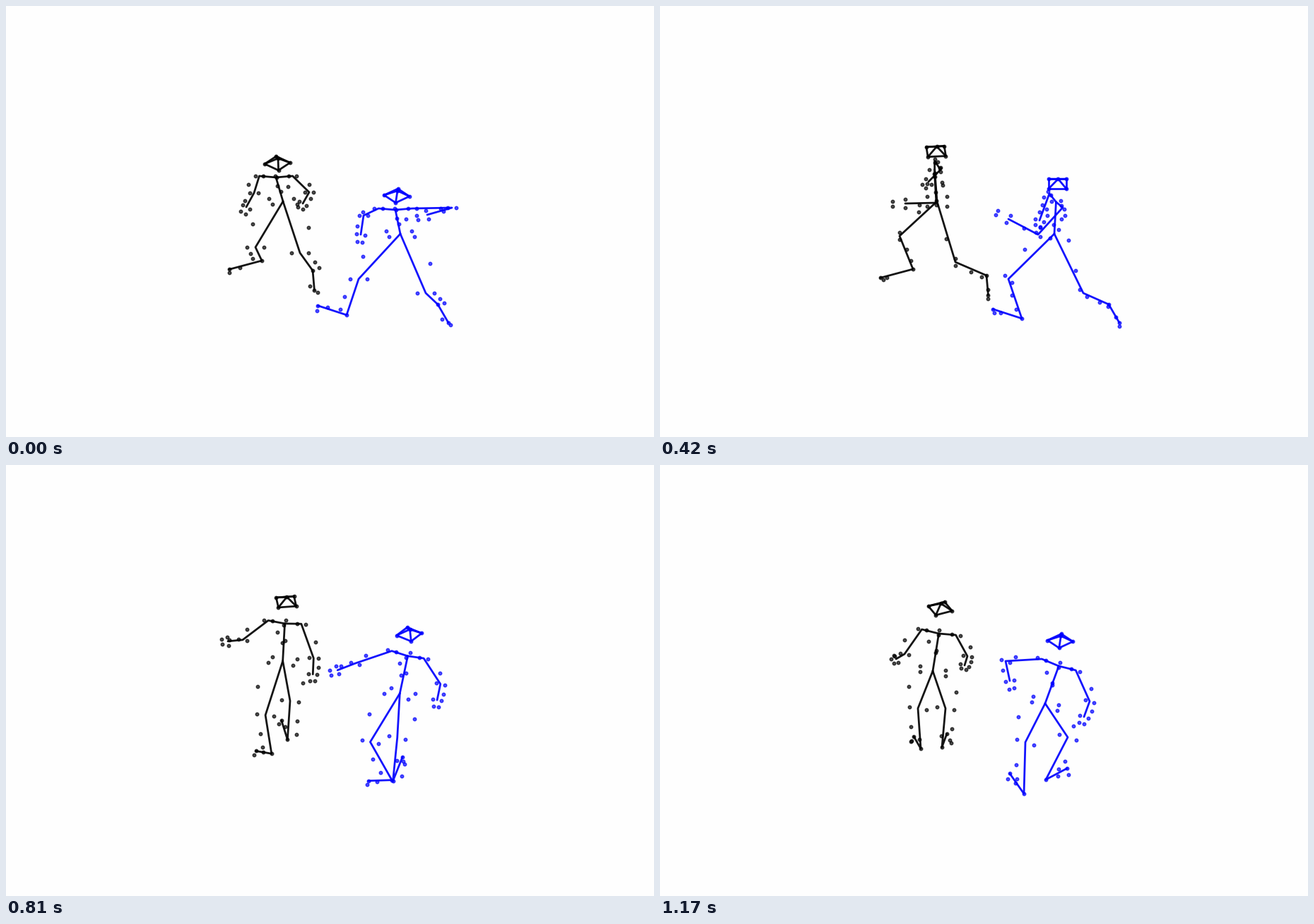
Recreate the animation shown at these times as a matplotlib script. Size 917 px wide and 611 px high, loop 1200 ms.

```python
import numpy as np
import matplotlib.pyplot as plt
from matplotlib.animation import FuncAnimation
from matplotlib.collections import LineCollection

W, H, DPI = 917, 611, 100
FRAMES, STEP = 40, 30
T = np.arange(FRAMES)
KEYS = np.array([0, 14, 23, 31, 39])
GIRTH = 24  # half the shoulder width

# Points are complex numbers x + yj; a path holds one point per frame.


def ramp(start, end):
    u = np.clip((T - start) / (end - start), 0, 1)
    return u * u * (3 - 2 * u)


def mix(a, b, u):
    return a + (b - a) * u


def glide(*points):
    """Smooth path through one point per key time."""
    p = np.array(points)
    slope = np.gradient(p, KEYS, edge_order=2)
    i = np.clip(np.searchsorted(KEYS, T, side="right") - 1, 0, len(KEYS) - 2)
    span = KEYS[i + 1] - KEYS[i]
    u = (T - KEYS[i]) / span
    bend = slope[i] * (1 - u) - slope[i + 1] * u
    return mix(p[i], p[i + 1], u * u * (3 - 2 * u)) + span * u * (1 - u) * bend


def swing(angles, lengths, times):
    """Foot vector that turns and changes length, angles in degrees."""
    s = ramp(*times)
    return mix(*lengths, s) * np.exp(1j * np.radians(mix(*angles, s)))


def head_shape(neck, gaze):
    """Four corners of a tilted ring, then the crown."""
    center = neck + 2 - 1j * (20 + 16 * T / FRAMES)
    a = np.radians(gaze)
    side = 18 * np.cos(a) - 10j * np.sin(a)
    front = -18 * np.sin(a) - 10j * np.cos(a)
    return [center + front, center + side, center - front, center - side,
            center + 1 - 7j]


def torso_dots(pelvis, neck, right, front):
    def at(height, side, depth):
        return mix(pelvis, neck, height) + side * right + depth * front

    waist = [at(0, s, d) for s in (-0.75, 0.75) for d in (-0.6, 0.6)]
    return waist + [at(1, 0, 0.3), at(0.55, 0, 0.5), at(1.05, 0, -0.3),
                    at(0.5, 0, -0.4), at(0.7, -0.5, -0.4)]


def arm_dots(shoulder, elbow, hand, out):
    across = 6j * (hand - elbow) / abs(hand - elbow)
    dots = [mix(shoulder, elbow, 0.5) + 0.5 * out,
            mix(elbow, hand, 0.55) + 0.3 * out]
    for s in (-1, 1):
        dots += [shoulder + 0.25 * s * out, elbow + 0.27 * s * out,
                 hand + s * across, mix(elbow, hand, 1.4) + 0.6 * s * across]
    return dots


def leg_dots(pelvis, knee, ankle, toe, out):
    return [mix(pelvis, knee, 0.5) + out,
            knee - 0.5 * out, knee + 0.5 * out,
            mix(knee, ankle, 0.5) + 0.5 * out,
            mix(knee, ankle, 0.85) + 0.5 * out,
            mix(ankle, toe, 0.8) - 0.25 * out,
            mix(ankle, toe, 0.9) + 0.2 * out + 6j]


class Walker:
    def __init__(self, color, pelvis, lean, turn, tilt, gaze, arms, legs, feet):
        pelvis = mix(*pelvis, ramp(25, 39))
        neck = pelvis + mix(*lean, T / FRAMES) - 1j * mix(34, 53, ramp(0, 25))
        spine = mix(pelvis, neck, 0.45)

        # Body axes on screen: facing away, then left, then to the viewer
        width = GIRTH * np.tanh((T - turn) / 6)
        dip = tilt * ramp(20, 31) - 11 * np.exp(-((T - 16) / 6) ** 2)
        across = width + 1j * dip
        front = -np.sqrt(GIRTH ** 2 - width ** 2) + 0.3j * width

        head = head_shape(neck, glide(*gaze))
        lines = [head[:4] + head[:1], [pelvis, spine, neck]]
        lines += [[head[4], corner] for corner in head[:4]]
        dots = head + torso_dots(pelvis, neck, across, front)

        for out, (elbow, hand), (knee, ankle), foot in zip(
                (across, -across), arms, legs, feet):
            shoulder = neck + out - 2j
            elbow, hand = glide(*elbow), glide(*hand)
            knee, ankle = glide(*knee), glide(*ankle)
            toe = ankle + swing(*foot)
            lines += [[neck, shoulder, elbow, hand], [pelvis, knee, ankle, toe]]
            dots += [ankle, toe] + arm_dots(shoulder, elbow, hand, out)
            dots += leg_dots(pelvis, knee, ankle, toe, out)

        self.lines = [np.array(line) for line in lines]
        self.dots = np.array(dots)
        self.bones = LineCollection([], colors=color, linewidths=2, alpha=0.92,
                                    capstyle="round", joinstyle="round")
        ax.add_collection(self.bones)
        self.marks, = ax.plot([], [], ".", color=color, ms=6.5, alpha=0.7)

    def pose(self, i):
        self.bones.set_segments(
            [np.column_stack([p[:, i].real, p[:, i].imag]) for p in self.lines])
        self.marks.set_data(self.dots[:, i].real, self.dots[:, i].imag)
        return [self.bones, self.marks]


fig = plt.figure(figsize=((W + 0.01) / DPI, (H + 0.01) / DPI), dpi=DPI,
                 facecolor="#fefefe")
ax = fig.add_axes([0, 0, 1, 1])
ax.set(xlim=(0, W), ylim=(H, 0))
ax.axis("off")

# Limbs are given left side first: (elbow, hand) and (knee, ankle)
walkers = [
    Walker("black", pelvis=(392 + 277j, 386 + 292j), lean=(-10, 9),
           turn=14, tilt=4, gaze=(95, 50, -20, -45, -20),
           arms=[((351 + 265j, 397 + 232j, 436 + 258j, 431 + 285j, 435 + 271j),
                  (340 + 285j, 380 + 249j, 430 + 279j, 433 + 308j, 431 + 284j)),
                 ((429 + 264j, 391 + 279j, 329 + 251j, 347 + 250j, 346 + 268j),
                  (420 + 280j, 347 + 280j, 307 + 240j, 326 + 265j, 334 + 275j))],
           legs=[((353 + 342j, 339 + 326j, 389 + 330j, 409 + 339j, 404 + 345j),
                  (362 + 361j, 358 + 373j, 397 + 385j, 396 + 393j, 399 + 400j)),
                 ((416 + 350j, 418 + 363j, 378 + 356j, 361 + 353j, 365 + 345j),
                  (434 + 375j, 462 + 382j, 413 + 405j, 347 + 410j, 369 + 402j))],
           feet=[((165, 290), (48, 20), (20, 31)),
                 ((85, 240), (28, 20), (14, 35))]),
    Walker("blue", pelvis=(558 + 323j, 545 + 338j), lean=(-7, 20),
           turn=16.5, tilt=8, gaze=(85, 45, 20, 0, -5),
           arms=[((506 + 297j, 544 + 285j, 606 + 300j, 616 + 321j, 608 + 335j),
                  (502 + 324j, 537 + 304j, 601 + 322j, 611 + 344j, 600 + 357j)),
                 ((631 + 286j, 535 + 324j, 497 + 287j, 495 + 279j, 489 + 278j),
                  (596 + 296j, 493 + 302j, 457 + 278j, 486 + 306j, 495 + 306j))],
           legs=[((499 + 387j, 493 + 387j, 541 + 384j, 563 + 389j, 577 + 386j),
                  (482 + 438j, 512 + 443j, 558 + 447j, 534 + 448j, 546 + 446j)),
                 ((594 + 407j, 599 + 407j, 525 + 404j, 514 + 383j, 517 + 393j),
                  (611 + 423j, 635 + 423j, 584 + 440j, 514 + 453j, 515 + 466j))],
           feet=[((198, 332), (43, 34), (20, 31)),
                 ((60, 235), (30, 35), (14, 35))]),
]


def draw(i):
    return [part for w in walkers for part in w.pose(i)]


anim = FuncAnimation(fig, draw, frames=FRAMES, interval=STEP, repeat=True,
                     repeat_delay=0, blit=False)
plt.show()
```
